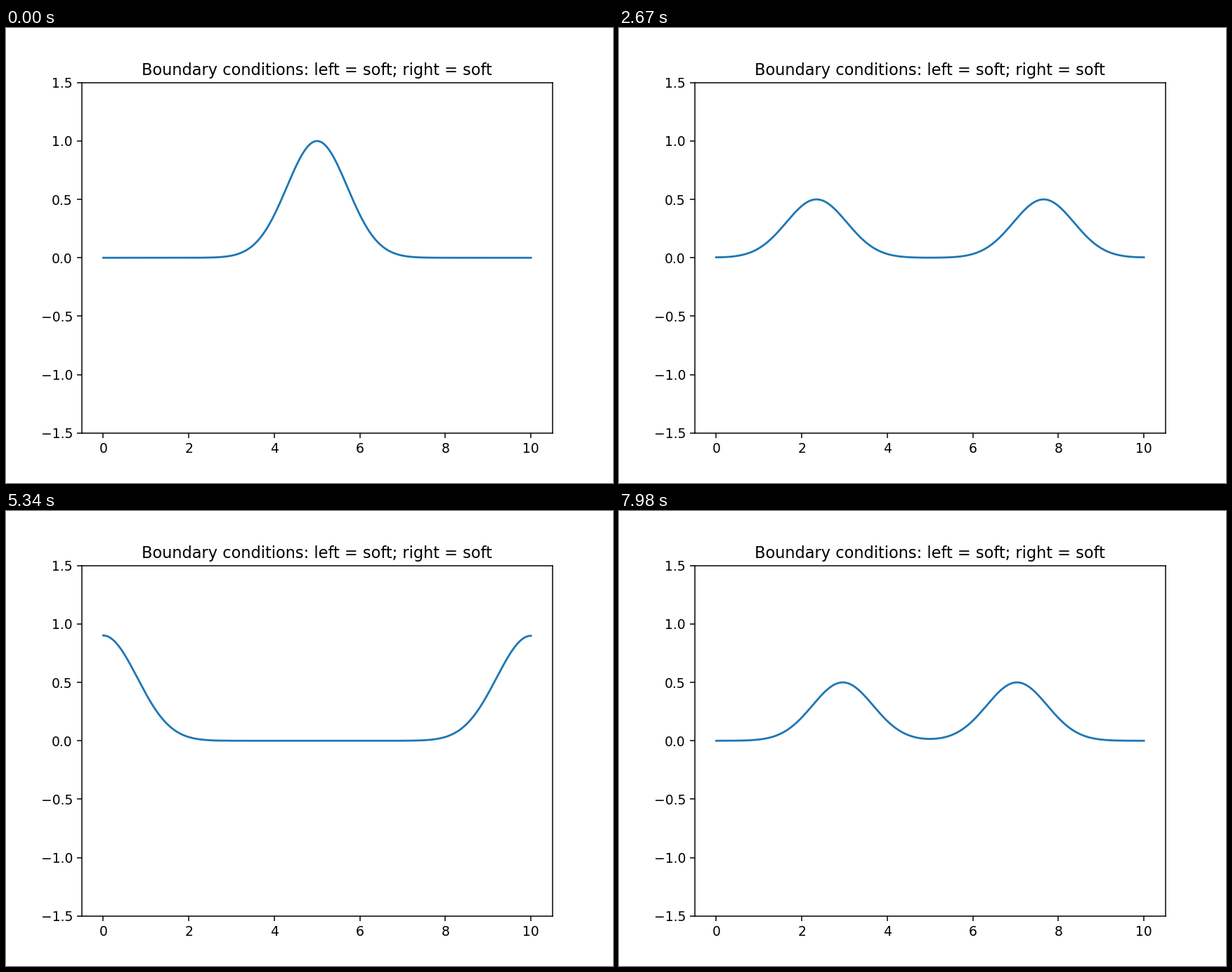
A matplotlib script that plays this animation: 864 by 648 pixels, repeating every 8 s.

```python
import numpy as np
import matplotlib.pyplot as plt
from matplotlib.animation import FuncAnimation

LENGTH = 10.0
CENTER = 5.0
STEP = 0.03                        # distance travelled per time step
LEFT_WALL, RIGHT_WALL = -0.0035, 9.9985   # effective mirror positions
FRAMES, INTERVAL = 400, 20         # 8 s loop; the wave advances every 30 ms

x = np.linspace(0, LENGTH, 1001)


def pulse(center):
    return 0.5 * np.exp(-(x - center) ** 2)


def wave(step):
    """Two travelling halves of a pulse plus their echoes from soft ends."""
    d = STEP * (step - 0.5)
    right, left = CENTER + d, CENTER - d
    echoes = pulse(2 * RIGHT_WALL - right) + pulse(2 * LEFT_WALL - left)
    return pulse(right) + pulse(left) + echoes


fig, ax = plt.subplots(figsize=(6.4, 4.8), dpi=135)
ax.set_xlim(-0.5, 10.5)
ax.set_ylim(-1.5, 1.5)
ax.set_title("Boundary conditions: left = soft; right = soft")
line, = ax.plot(x, wave(0), color="#1f77b4", lw=1.5)


def update(i):
    line.set_ydata(wave((2 * i + 1) // 3))
    return line,


anim = FuncAnimation(fig, update, frames=FRAMES, interval=INTERVAL,
                     init_func=lambda: update(0), repeat=True, repeat_delay=0)
plt.show()
```
